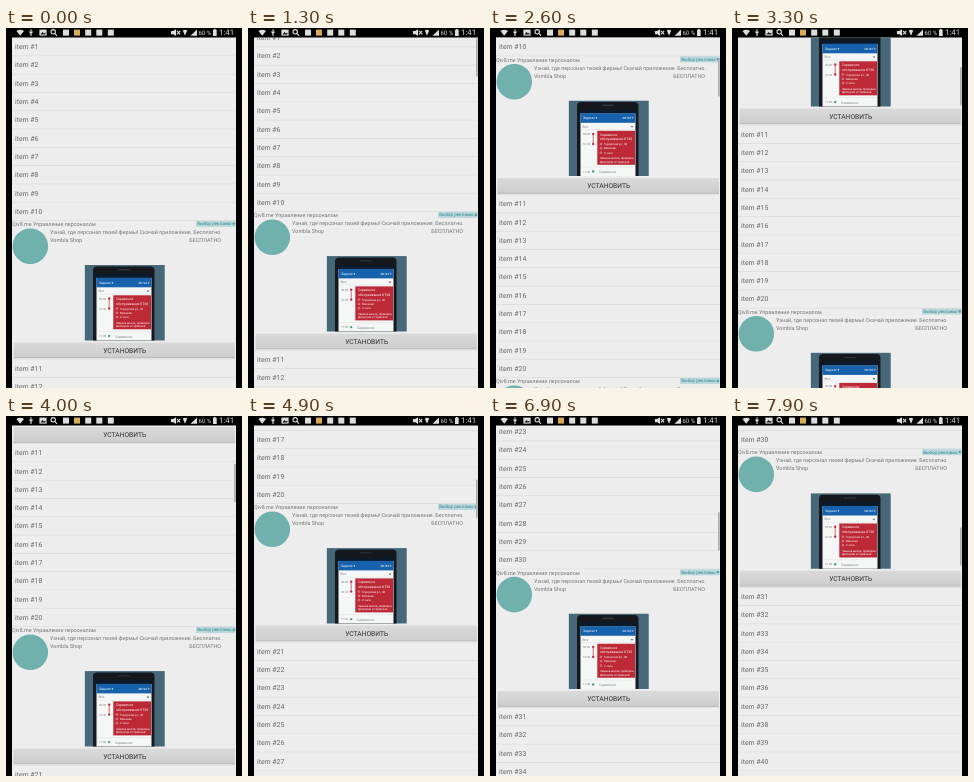
These frames come from a looping animation (236x360 px, 8 s). An HTML page:

```html
<!DOCTYPE html>
<html lang="ru">
<head>
<meta charset="utf-8">
<title>Прокрутка списка</title>
<style>
  html, body { margin: 0; width: 100%; height: 100%; overflow: hidden; background: #000; }
  svg { display: block; width: 100%; height: 100%; }
  text { font-family: Roboto, "Noto Sans", sans-serif; text-rendering: geometricPrecision; }
  .item { font-size: 6.9px; fill: #666; }
  .copy { font-size: 5.4px; fill: #747474; }
  .tiny { font-size: 2.9px; fill: #fff; }
  .small { font-size: 3.4px; }
  .gray { fill: #7d8487; }
</style>
</head>
<body>
<svg viewBox="0 0 236 360">
  <defs>
    <clipPath id="view"><rect x="6" y="9.5" width="224" height="350.5"/></clipPath>
    <clipPath id="photo"><rect x="78.7" y="44.5" width="80" height="75.5"/></clipPath>
    <linearGradient id="face" x2="0" y2="1">
      <stop stop-color="#dadada"/><stop offset="1" stop-color="#cdcdcd"/>
    </linearGradient>
    <g id="ad">
      <text class="copy" x="6" y="5.8">Qiv8.me Управление персоналом</text>
      <rect x="190" y=".2" width="39.7" height="6.2" fill="#bcd8dc"/>
      <text x="191.2" y="4.9" font-size="4.5" fill="#348793">Выбор рекламы</text>
      <circle cx="227.8" cy="3.3" r="1.3" fill="#4aa3af"/>
      <circle cx="24.3" cy="25.7" r="17.8" fill="#70b0ad"/>
      <text class="copy" x="44" y="13.6">Узнай, где персонал твоей фирмы! Скачай приложение. Бесплатно.</text>
      <text class="copy" x="44" y="21.6">Vombla Shop</text>
      <text class="copy" x="215" y="21.6" text-anchor="end">БЕСПЛАТНО</text>
      <g clip-path="url(#photo)">
        <rect x="78.5" y="44.5" width="81" height="76" fill="#466879"/>
        <rect x="87" y="46" width="61.5" height="90" rx="4" fill="#15191e"/>
        <rect x="112" y="48.8" width="12" height=".9" rx=".4" fill="#3a4148"/>
        <rect x="90.5" y="57.3" width="55" height="70" fill="#f5f6f6"/>
        <rect x="90.5" y="53.5" width="55" height="3.8" fill="#0d1a2c"/>
        <rect x="90.5" y="57.3" width="55" height="9.5" fill="#1762ac"/>
        <text class="tiny small" x="93" y="63.3">Задачи ▾</text>
        <text class="tiny" x="143.5" y="63.2" text-anchor="end">ФИЛЬТР</text>
        <text class="tiny small gray" x="92.5" y="71.8">Все</text>
        <path d="M140.5 70H143.5L142 71.8Z" fill="#6f7679"/>
        <path d="M91 73.6H145" stroke="#dde0e1" stroke-width=".5"/>
        <path d="M103.2 78V88" stroke="#c74750" stroke-width=".8"/>
        <circle cx="103.2" cy="78" r="1.2" fill="#c33440"/>
        <circle cx="103.2" cy="88" r="1.2" fill="#c33440"/>
        <text class="tiny gray" x="93" y="79">09:00</text>
        <text class="tiny gray" x="93" y="89">10:30</text>
        <rect x="107.3" y="74.8" width="37.7" height="34" fill="#bd2937"/>
        <text class="tiny small" x="110" y="79.7">Сервисное</text>
        <text class="tiny small" x="110" y="84">обслуживание КТ30</text>
        <text class="tiny" x="114" y="89">Городская ул., 40</text>
        <text class="tiny" x="114" y="93.3">Механик</text>
        <text class="tiny" x="114" y="97.6">2 часа</text>
        <g fill="none" stroke="#f4c7c9" stroke-width=".5">
          <circle cx="111" cy="88" r=".9"/><circle cx="111" cy="92.3" r=".9"/><circle cx="111" cy="96.6" r=".9"/>
        </g>
        <text class="tiny" x="110" y="103">Замена масла, проверка</text>
        <text class="tiny" x="110" y="106.6">фильтров и тормозов</text>
        <path d="M91 111H145" stroke="#dde0e1" stroke-width=".5"/>
        <circle cx="103.2" cy="115.5" r="1.2" fill="#43a56f"/>
        <text class="tiny gray" x="93" y="116.5">11:00</text>
        <text class="tiny small gray" x="109" y="117">Сервисное</text>
      </g>
      <rect x="7.5" y="122" width="221.5" height="15.5" rx="1" fill="url(#face)"/>
      <path d="M7.5 137.3H229" stroke="#b0b0b0" stroke-width=".8"/>
      <text x="118.7" y="132.3" font-size="6.7" fill="#2c2c2c" text-anchor="middle">УСТАНОВИТЬ</text>
    </g>
  </defs>
  <rect width="236" height="360"/>
  <rect x="6" y="9.5" width="224" height="350.5" fill="#ededed"/>
  <g clip-path="url(#view)">
    <g id="list"></g>
    <rect id="thumb" x="228" width="1.8" height="38" fill="#b0b0b0"/>
  </g>

  <g fill="none" stroke="#ddd" stroke-width="1.1">
    <path d="M25 1.2V8M23.4 3.6L25 5.4L26.6 3.6"/>
    <circle cx="47.2" cy="3.8" r="2.2"/><path d="M48.8 5.4L51 7.8"/>
    <path d="M169.5 2.3V7L167.3 5.6H165.5V3.5H167.3Z" fill="#ddd"/>
    <path d="M171 2.8L174.2 6.4M174.2 2.8L171 6.4"/>
  </g>
  <g fill="#ddd">
    <path id="wifi" d="M10.5 3Q14.2 .4 18 3L14.2 7.8Z"/>
    <rect x="33.4" y="1.6" width="7.2" height="6"/>
    <rect x="57" y="1.6" width="6" height="6"/>
    <rect x="79.2" y="1.6" width="6" height="6"/>
    <rect x="90.3" y="1.6" width="6" height="6"/>
    <rect x="101.8" y="1.6" width="6" height="6"/>
    <path d="M176.8 2.6Q179 1 181.2 2.6L179 7.8Z"/>
    <path d="M184.5 7.8H191V1.5Z"/>
    <path d="M207 1.8H208V1H209.7V1.8H210.7V8H207Z"/>
    <text x="192.5" y="7" font-size="6">60 %</text>
    <text x="213" y="7.4" font-size="7.8">1:41</text>
  </g>
  <path d="M34.5 6.6L36.4 4L38 5.6L39.4 4.4V6.6Z" fill="#111"/>
  <rect x="68" y="1.6" width="6" height="6" fill="#d9ac55"/>
</svg>
<script>
const LOOP = 8000, STEP = 100;
const TOP = 9.5, ROW = 18.3, AD = 138.6, GROUP = ROW * 10 + AD;
const GROUPS = 4, ADS = 3;
const SCROLL_START = 1200, THUMB_RATE = 0.127;

// Scroll offsets the finger passes through: [time, distance]
const path = [
  [1200, 0], [1900, 64.5], [2600, 164.5], [4000, 303.5],
  [4900, 426.5], [6000, 572.5], [7900, 803]
];

const list = document.getElementById('list');
const thumb = document.getElementById('thumb');

function add(name, attrs, text = '') {
  const node = document.createElementNS('http://www.w3.org/2000/svg', name);
  for (const key in attrs) node.setAttribute(key, attrs[key]);
  node.textContent = text;
  list.append(node);
}

function addDivider(y) {
  add('rect', { x: 6, y: y - 0.4, width: 224, height: 0.8, fill: '#dedede' });
}

for (let group = 0; group < GROUPS; group++) {
  const top = TOP + group * GROUP;
  for (let i = 0; i < 10; i++) {
    const y = top + i * ROW;
    add('text', { class: 'item', x: 9, y: y + 11.6 }, `item #${group * 10 + i + 1}`);
    addDivider(y + ROW);
  }
  if (group < ADS) {
    const adTop = top + 10 * ROW;
    add('use', { href: '#ad', y: adTop });
    addDivider(adTop + AD);
  }
}

function slope(i) {
  const [t0, s0] = path[Math.max(i - 1, 0)];
  const [t1, s1] = path[Math.min(i + 1, path.length - 1)];
  return (s1 - s0) / (t1 - t0);
}

// Cubic Hermite interpolation between the scroll points
function scrollAt(time) {
  if (time <= SCROLL_START) return 0;
  let i = 0;
  while (i < path.length - 2 && time > path[i + 1][0]) i++;
  const [t0, s0] = path[i], [t1, s1] = path[i + 1];
  const span = t1 - t0, u = Math.min((time - t0) / span, 1), v = 1 - u;
  return v * v * (1 + 2 * u) * s0 + u * u * (3 - 2 * u) * s1
    + span * u * v * (v * slope(i) - u * slope(i + 1));
}

function render(now) {
  const time = Math.floor((now % LOOP) / STEP) * STEP;
  const scroll = scrollAt(time);
  list.setAttribute('transform', `translate(0 ${-scroll})`);
  thumb.setAttribute('y', TOP + scroll * THUMB_RATE);
  thumb.setAttribute('opacity', scroll > 0 ? 1 : 0);
}

const start = performance.now();
function tick() {
  render(performance.now() - start);
  requestAnimationFrame(tick);
}
tick();
</script>
</body>
</html>
```
